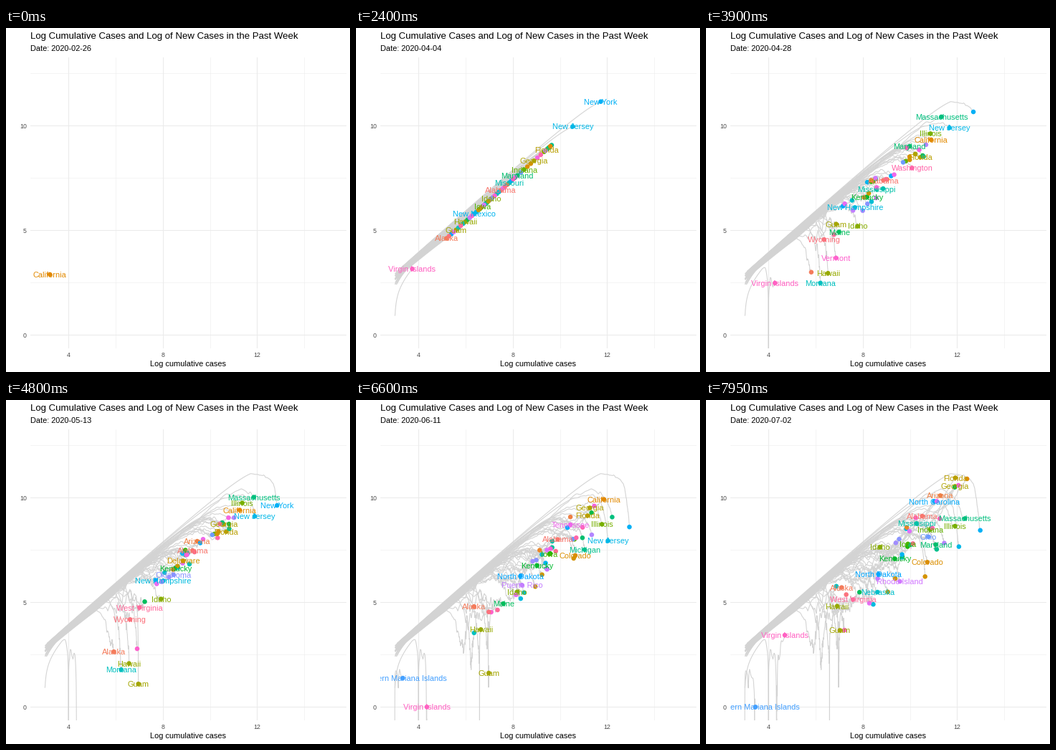
A matplotlib script that plays this animation: 480x480 px, repeating every 8 s.

```python
import numpy as np
import matplotlib.pyplot as plt
from matplotlib.animation import FuncAnimation
from matplotlib.collections import LineCollection

plt.rcParams["font.family"] = ["Liberation Sans", "DejaVu Sans"]

SIZE, DPI = 480, 80
PT = 72 / DPI                      # points per pixel
LEFT, TOP, RIGHT, BOTTOM = 34, 40.5, 474.5, 446.5
X_UNIT, Y_UNIT = 32.92, 29.2       # pixels per data unit
X_ZERO, Y_ZERO = 87 - 4 * X_UNIT, 428.3

STEPS, STEP_DAYS, GRID, PER_STEP = 54, 2.4, 0.4, 6
DAYS = np.arange((STEPS - 1) * PER_STEP + 1) * GRID
KNOTS = np.array([16, 26, 32, 44, 53]) * STEP_DAYS
ANCHOR = 16 * PER_STEP
LABEL_HEIGHT = 8
rng = np.random.default_rng(7)


def split(text):
    return [" ".join(name.split()) for name in text.split(",")]


# Places from most to fewest cases in early April
RANKED = split("""New York, New Jersey, Michigan, California, Louisiana,
    Massachusetts, Florida, Pennsylvania, Illinois, Washington, Texas, Georgia,
    Connecticut, Colorado, Indiana, Ohio, Maryland, Tennessee, Virginia,
    North Carolina, Missouri, Arizona, Wisconsin, South Carolina, Alabama, Nevada,
    Mississippi, Utah, Oklahoma, Idaho, Oregon, District of Columbia, Kentucky,
    Minnesota, Rhode Island, Iowa, Arkansas, Kansas, Delaware, New Hampshire,
    New Mexico, Vermont, Puerto Rico, Maine, Hawaii, Nebraska, West Virginia,
    Montana, Guam, South Dakota, North Dakota, Wyoming, Alaska, Virgin Islands,
    Northern Mariana Islands""")
LATE_WAVE = split("""Massachusetts, Maryland, Virginia, Iowa, Minnesota,
    Rhode Island, Kansas, Delaware, New Mexico, Nebraska, South Dakota,
    North Dakota""")
EARLY_PEAK = split("""Michigan, Louisiana, Washington, West Virginia, Maine, Oregon,
    Oklahoma, Nevada, Missouri, South Carolina""")
SURGING = split("""Alabama, Arkansas, Georgia, Louisiana, Mississippi, Nevada,
    North Carolina, Oklahoma, Oregon, South Carolina, Tennessee, Texas, Utah""")
FADING = split("""Colorado, Delaware, District of Columbia, Maryland, Massachusetts,
    Michigan, New Hampshire, Pennsylvania, Rhode Island, Nebraska, South Dakota""")

# Log weekly cases at the later knots where a place leaves the common pattern
OUTLIERS = {
    "New York": (10.66, 9.63, 8.6, 8.44),
    "New Jersey": (9.9, 9.11, 7.94, 7.66),
    "California": (9.33, 9.41, 9.92, 10.9),
    "Florida": (8.49, 8.38, 9.14, 10.95),
    "Illinois": (9.62, 9.75, 8.73, 8.64),
    "Arizona": (7.43, 7.92, 9.08, 10.1),
    "Connecticut": (8.37, 8.27, 7.1, 6.23),
    "Idaho": (5.2, 5.16, 5.5, 7.64),
    "Guam": (5.3, 1.1, 1.62, 3.66),
    "Hawaii": (2.95, 2.08, 3.7, 4.82),
    "Alaska": (3.0, 2.64, 4.8, 5.71),
    "Montana": (2.48, 1.78, 3.54, 5.77),
    "Vermont": (3.68, 2.78, 4.53, 3.67),
    "Wyoming": (4.56, 4.18, 4.54, 5.37),
    "Virgin Islands": (2.48, -3, 0, 3.43),
    "Northern Mariana Islands": (1.38, 1.38, 1.38, 0),
}
FIRST_DAY = {"California": -1, "Washington": 4, "Virgin Islands": 27,
             "Northern Mariana Islands": 87}
QUIET_DAYS = {"Hawaii": [92], "Virgin Islands": [47],
              "Northern Mariana Islands": [88, 115]}


def log_size(rank):
    """Log cumulative cases at the first knot."""
    return np.interp(rank, [0, 1, 2, 8, 16, 28, 38, 45, 52, 53, 54],
                     [11.73, 10.54, 9.65, 9.33, 8.2, 7.15, 6.55, 5.9, 5.2, 3.74, 3])


def weekly_levels(name, size):
    """Log weekly cases at the knots: a spring change, then a regional trend."""
    first = size - 0.58
    if name in OUTLIERS:
        return np.array([first, *OUTLIERS[name]])
    spring = 0.75 if name in LATE_WAVE else -1.0 if name in EARLY_PEAK else -0.25
    trend = ((0.2, 0.7, 1.05) if name in SURGING else
             (-0.2, -0.85, -0.2) if name in FADING else (0, -0.1, 0.35))
    later = size + spring + np.cumsum([0, *trend]) + rng.normal(0, 0.12, 4)
    return np.array([first, *later])


def make_track(name, size):
    """Exponential phase up to the first knot, then cases summed from weekly levels."""
    levels = weekly_levels(name, size)
    start = FIRST_DAY.get(name, 23 - 2.3 * (size - 5.3))
    phase = np.interp(DAYS, KNOTS, np.arange(len(KNOTS)))
    window = np.abs(np.sin(np.pi * phase))
    bump = np.clip(0.2 + 0.25 * (levels[1] - levels[0]), -0.1, 0.3)
    daily = np.convolve(rng.normal(size=131), [0.25, 0.5, 0.25], "valid")
    wobble = 1.5 * np.exp(-levels.mean() / 3) * np.interp(DAYS, np.arange(129), daily)
    y = np.interp(DAYS, KNOTS, levels) + window * (wobble + bump * (phase < 1))
    for day in QUIET_DAYS.get(name, []):
        y -= 8 * np.exp(-((DAYS - day) / 3) ** 2)

    weekly = np.exp(y) * GRID / 7
    weekly[:max(ANCHOR, round(start / GRID))] = 0
    x = np.log(np.exp(size) + np.cumsum(weekly) - weekly)

    tau, span = DAYS - start, KNOTS[0] - start
    end_slope = -np.log(1 - np.exp(levels[0] - size)) / 7
    slope = 2 * (size - 3) / span - end_slope
    early = 3 + slope * tau + (end_slope - slope) / (2 * span) * tau ** 2
    growth = np.maximum(np.gradient(early, GRID), 0.02)
    early_y = early + np.log(1 - np.exp(-7 * growth))
    early_y -= 0.6 * rng.random() ** 3 * np.exp(-tau / 1.5)
    x[:ANCHOR], y[:ANCHOR] = early[:ANCHOR], early_y[:ANCHOR]

    return int(np.ceil(max(start, 0) / GRID)), np.column_stack([x, y])


def hcl(hue, chroma=100, light=65):
    """Polar CIE-LUV colour as clipped sRGB."""
    angle = np.radians(hue)
    u = chroma * np.cos(angle) / (13 * light) + 0.19784
    v = chroma * np.sin(angle) / (13 * light) + 0.46834
    big_y = ((light + 16) / 116) ** 3
    big_x = big_y * 9 * u / (4 * v)
    big_z = big_y * (12 - 3 * u - 20 * v) / (4 * v)
    rgb = np.array([[3.2406, -1.5372, -0.4986],
                    [-0.9689, 1.8758, 0.0415],
                    [0.0557, -0.2040, 1.0570]]) @ [big_x, big_y, big_z]
    rgb = np.clip(rgb, 0, 1)
    return np.where(rgb > 0.0031308, 1.055 * rgb ** (1 / 2.4) - 0.055, 12.92 * rgb)


fig = plt.figure(figsize=(SIZE / DPI, SIZE / DPI), dpi=DPI, facecolor="white")
ax = fig.add_axes([LEFT / SIZE, 1 - BOTTOM / SIZE,
                   (RIGHT - LEFT) / SIZE, (BOTTOM - TOP) / SIZE])
ax.set_xlim((LEFT - X_ZERO) / X_UNIT, (RIGHT - X_ZERO) / X_UNIT)
ax.set_ylim((Y_ZERO - BOTTOM) / Y_UNIT, (Y_ZERO - TOP) / Y_UNIT)
ax.axis("off")


def write(x, y, text, size, color="black", ha="left"):
    return fig.text(x / SIZE, 1 - y / SIZE, text, fontsize=size * PT,
                    color=color, ha=ha, va="baseline")


def grid(xs, ys, width):
    for x in xs:
        ax.axvline(x, color="#EBEBEB", lw=width * PT, zorder=0)
    for y in ys:
        ax.axhline(y, color="#EBEBEB", lw=width * PT, zorder=0)


grid((6, 10, 14), (2.5, 7.5, 12.5), 0.53)
grid((4, 8, 12), (0, 5, 10), 1.07)
for x in (4, 8, 12):
    write(X_ZERO + x * X_UNIT, 459, str(x), 8.8, "#4D4D4D", "center")
for y in (0, 5, 10):
    write(29, Y_ZERO - y * Y_UNIT + 3.2, str(y), 8.8, "#4D4D4D", "right")
write(34, 15, "Log Cumulative Cases and Log of New Cases in the Past Week", 13.2)
write(254, 472, "Log cumulative cases", 11, ha="center")
date_text = write(34, 32, "", 11)

tracks = {name: make_track(name, log_size(rank)) for rank, name in enumerate(RANKED)}

# Groups are ordered by their number read as text: 1, 10, 11, ..., 2, 20, ...
alphabetical = sorted(RANKED)
order = sorted(range(len(alphabetical)), key=lambda i: str(i + 1))
names = [alphabetical[i] for i in order]
colors = [hcl(15 + 360 * i / len(order)) for i in order]

trails = LineCollection([], colors="#D3D3D3", linewidths=1.07 * PT, zorder=1)
ax.add_collection(trails, autolim=False)
dots = ax.scatter(np.zeros(len(names)), np.zeros(len(names)), s=(6.5 * PT) ** 2,
                  c=colors, linewidths=0, zorder=2)
labels = [ax.text(5, 5, name, fontsize=11.04 * PT, color=color, ha="center",
                  va="baseline", clip_on=True, zorder=3)
          for name, color in zip(names, colors)]
renderer = fig.canvas.get_renderer()
widths = [label.get_window_extent(renderer).width for label in labels]


def place_labels(heads):
    """Show each label only where it is clear of those already placed."""
    placed = []
    for label, width, (x, y) in zip(labels, widths, heads):
        px, py = x * X_UNIT, y * Y_UNIT
        free = np.isfinite(px) and all(
            abs(px - qx) >= (width + qw) / 2 or abs(py - qy) >= LABEL_HEIGHT
            for qx, qy, qw in placed)
        label.set_visible(bool(free))
        if free:
            placed.append((px, py, width))
            label.set_position((x, y - 4 / Y_UNIT))


def update(frame):
    step = frame // 3
    now = step * PER_STEP
    date = np.datetime64("2020-02-26") + int(round(step * STEP_DAYS))
    date_text.set_text(f"Date: {date}")
    heads, lines = [], []
    for name in names:
        first, path = tracks[name]
        if now >= first:
            heads.append(path[now])
            lines.append(path[first:now + 1])
        else:
            heads.append((np.nan, np.nan))
    trails.set_segments(lines)
    dots.set_offsets(np.ma.masked_invalid(heads))
    place_labels(heads)
    return [trails, dots, date_text, *labels]


# 54 steps of 150 ms, the last one cut to 50 ms
animation = FuncAnimation(fig, update, frames=160, interval=50, repeat=True,
                          repeat_delay=0)
plt.show()
```
